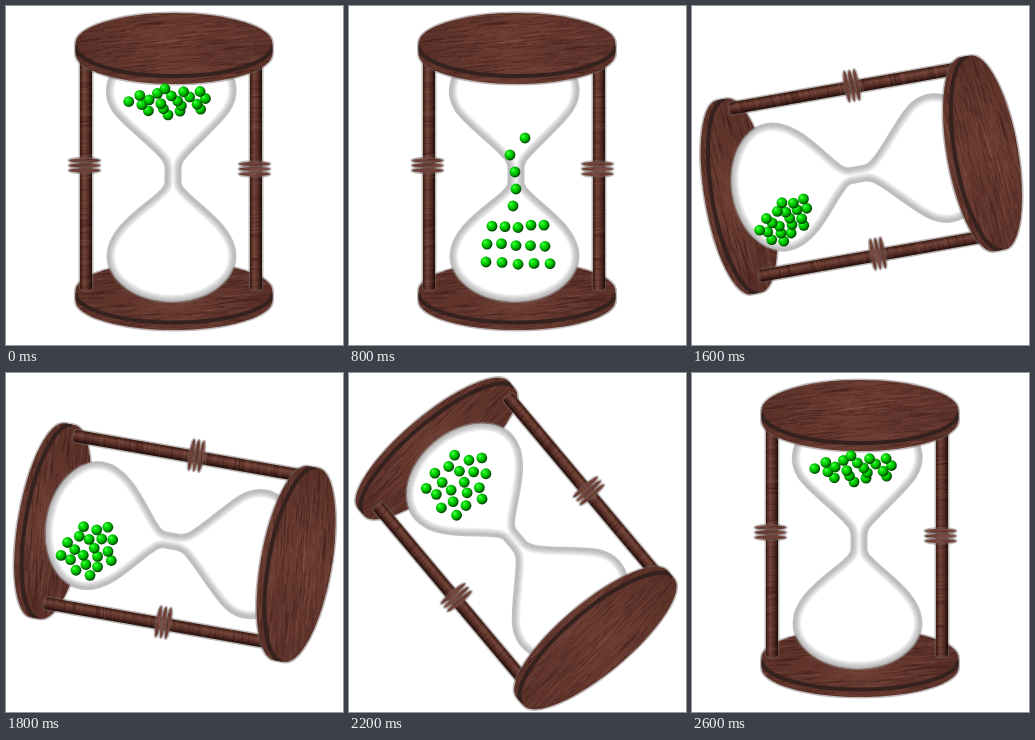
Recreate the animation shown at these times as an HTML page with a canvas. Size 337 by 339 pixels, loop 2800 ms.

```html
<!DOCTYPE html>
<html lang="en">
<head>
<meta charset="utf-8">
<title>Hourglass</title>
<style>
  html, body { margin: 0; width: 100%; height: 100%; overflow: hidden; background: #fff; }
  canvas { display: block; width: 337px; height: 339px; }
</style>
</head>
<body>
<canvas id="stage" width="337" height="339"></canvas>
<script>
const ctx = document.getElementById('stage').getContext('2d');
const STEP = 200, STEPS = 14, FALL = 4, TILT = 20, COUNT = 20;
const PIVOT = { x: 166.7, y: 168 };
const NECK = { x: 167, y: 160 };

let seed = 1;
const rand = () => (seed = (seed * 16807) % 2147483647) / 2147483647;
const mix = (a, b, p) => ({ x: a.x + (b.x - a.x) * p, y: a.y + (b.y - a.y) * p });

function turn({ x, y }, deg) {
  const a = deg * Math.PI / 180, c = Math.cos(a), s = Math.sin(a);
  const dx = x - PIVOT.x, dy = y - PIVOT.y;
  return { x: PIVOT.x + dx * c - dy * s, y: PIVOT.y + dx * s + dy * c };
}

// Evenly spread points in a unit circle, lowest first.
const spread = Array.from({ length: COUNT }, (_, i) => {
  const r = Math.sqrt((i + 0.6) / COUNT), a = i * 2.39996;
  return { x: r * Math.cos(a), y: r * Math.sin(a) };
}).sort((a, b) => b.y - a.y);

// A heap is the unit circle stretched and sheared.
const heap = (cx, cy, rx, ry, shear = 0) =>
  spread.map(p => ({ x: cx + rx * p.x, y: cy + ry * p.y + shear * p.x }));

const full = heap(164, 95, 44, 14);

// Three settled rows, then a stream still running through the neck.
const fallen = spread.map((_, i) => {
  const row = Math.floor(i / 5), col = i % 5 - 2;
  return row < 3
    ? { x: 169 + col * (16 - row * 1.5) + row % 2 * -2, y: 256 - 18.5 * row + rand() * 3 }
    : { x: 166 + col * (col > 0 ? 5 : 1) * (col % 2 ? -1 : 1), y: 166 - 17 * col };
});

// Resting heaps every second step of the turn, kept in the glass's own coordinates.
const poses = [
  fallen,
  heap(132, 239, 26, 39, -6),
  heap(93, 214, 27, 21, -10),
  heap(90, 138, 33, 35),
  heap(138, 92, 42, 34, -6),
].map((p, i) => p.map(q => turn(q, -2 * TILT * i)));

function drop(u) {
  const sag = u ** 3;
  return full.map((p, i) => {
    const end = fallen[i];
    const start = { x: NECK.x + (p.x - NECK.x) * (1 - sag / 2), y: p.y + 34 * sag };
    const t = Math.min(1, Math.max(0, (u - 0.036 * i) / 0.25));
    if (end.y < NECK.y) return mix(start, end, t);
    return t < 0.5 ? mix(start, NECK, t * 2) : mix(NECK, end, t * 2 - 1);
  });
}

function balls(step) {
  if (step <= FALL) return drop(step / FALL);
  const k = (step - FALL) / 2, from = poses[Math.floor(k)], to = poses[Math.ceil(k)];
  return from.map((p, i) => turn(mix(p, to[i], k % 1), (step - FALL) * TILT));
}

function halo(path) {
  ctx.strokeStyle = 'rgba(110,100,98,.45)';
  ctx.lineWidth = 3;
  ctx.stroke(path);
}

function wood(path, [x, y, w, h], fill, count) {
  halo(path);
  ctx.save();
  ctx.fillStyle = fill;
  ctx.fill(path);
  ctx.clip(path);
  ctx.lineWidth = 0.9;
  for (let i = 0; i < count; i++) {
    const gx = x + rand() * w - 10, gy = y + rand() * h, len = 6 + rand() * 26;
    ctx.strokeStyle = rand() < 0.55 ? 'rgba(40,16,12,.27)' : 'rgba(150,100,88,.22)';
    ctx.beginPath();
    ctx.moveTo(gx, gy);
    ctx.quadraticCurveTo(gx + len / 2, gy - rand() * 3, gx + len, gy - len * 0.1);
    ctx.stroke();
  }
  ctx.restore();
}

function across(x, w, ...colors) {
  const g = ctx.createLinearGradient(x, 0, x + w, 0);
  colors.forEach((c, i) => g.addColorStop(i / (colors.length - 1), c));
  return g;
}

function disc(cy, ry, thick) {
  const cx = 168, rx = 98.5, path = new Path2D();
  path.ellipse(cx, cy, rx, ry, 0, Math.PI, 2 * Math.PI);
  path.ellipse(cx, cy + thick, rx, ry, 0, 0, Math.PI);
  path.closePath();
  const fill = across(cx - rx, 2 * rx, '#5a3027', '#6a3c32', '#5a3028');
  wood(path, [cx - rx, cy - ry, 2 * rx, 2 * ry + thick], fill, 420);
  ctx.save();
  ctx.clip(path);
  ctx.strokeStyle = '#35211e';
  ctx.lineWidth = 4;
  ctx.beginPath();
  ctx.ellipse(cx, cy + 2, rx, ry, 0, 0, Math.PI);
  ctx.stroke();
  ctx.restore();
}

function post(x, ringY) {
  const path = new Path2D();
  path.roundRect(x, 52, 12, 232, 3);
  wood(path, [x, 52, 12, 232], across(x, 12, '#38190f', '#74453a', '#552d25', '#1e0c08'), 110);
  for (let i = 0; i < 3; i++) {
    const cx = x + 4.5, cy = ringY + i * 5, ring = new Path2D();
    ring.ellipse(cx, cy, 15.5, 2.2, 0, 0, 2 * Math.PI);
    wood(ring, [cx - 16, cy - 3, 32, 6], '#74463c', 12);
  }
}

const glassPath = new Path2D(`M110 62 C100 74 98 90 107 104 C116 118 142 136 154 150
  Q160 156 160 163 V176 Q160 181 153 187 C138 201 102 222 102 250
  C102 276 132 295.500 166 295.500 C200 295.500 229 276 229 250
  C229 222 194 201 181 187 Q174 181 174 176 V163 Q174 156 180 150
  C192 136 214 118 223 104 C232 90 231 74 221 62 Z`);

function glass() {
  ctx.strokeStyle = 'rgba(150,150,150,.6)';
  ctx.lineWidth = 3;
  ctx.stroke(glassPath);
  ctx.save();
  ctx.fillStyle = '#fff';
  ctx.fill(glassPath);
  ctx.clip(glassPath);
  ctx.strokeStyle = 'rgba(110,110,110,.09)';
  for (let w = 2; w <= 14; w += 2) {
    ctx.lineWidth = w;
    ctx.stroke(glassPath);
  }
  ctx.restore();
}

function hourglass(deg) {
  seed = 4711;
  ctx.save();
  ctx.translate(PIVOT.x, PIVOT.y);
  ctx.rotate(deg * Math.PI / 180);
  ctx.translate(-PIVOT.x, -PIVOT.y);
  disc(285, 29.5, 9.5);
  post(74, 154.5);
  post(244, 158);
  glass();
  disc(37.5, 30.5, 10);
  ctx.restore();
}

function ball({ x, y }) {
  const g = ctx.createRadialGradient(x - 2, y - 2, 0.4, x - 0.8, y - 0.8, 6.6);
  g.addColorStop(0, '#4dff4d');
  g.addColorStop(0.3, '#06e006');
  g.addColorStop(0.6, '#00b400');
  g.addColorStop(1, '#002c00');
  ctx.fillStyle = g;
  ctx.beginPath();
  ctx.arc(x, y, 5.4, 0, 2 * Math.PI);
  ctx.fill();
}

function draw(step) {
  if (step === STEPS - 1) step = 0; // half a turn done: upright and full again
  ctx.fillStyle = '#fff';
  ctx.fillRect(0, 0, 337, 339);
  hourglass(Math.max(0, step - FALL) * TILT);
  balls(step).forEach(ball);
}

let shown = -1;
const begin = performance.now();
function tick() {
  const step = Math.floor((performance.now() - begin) / STEP) % STEPS;
  if (step !== shown) draw(shown = step);
  requestAnimationFrame(tick);
}
tick();
</script>
</body>
</html>
```
